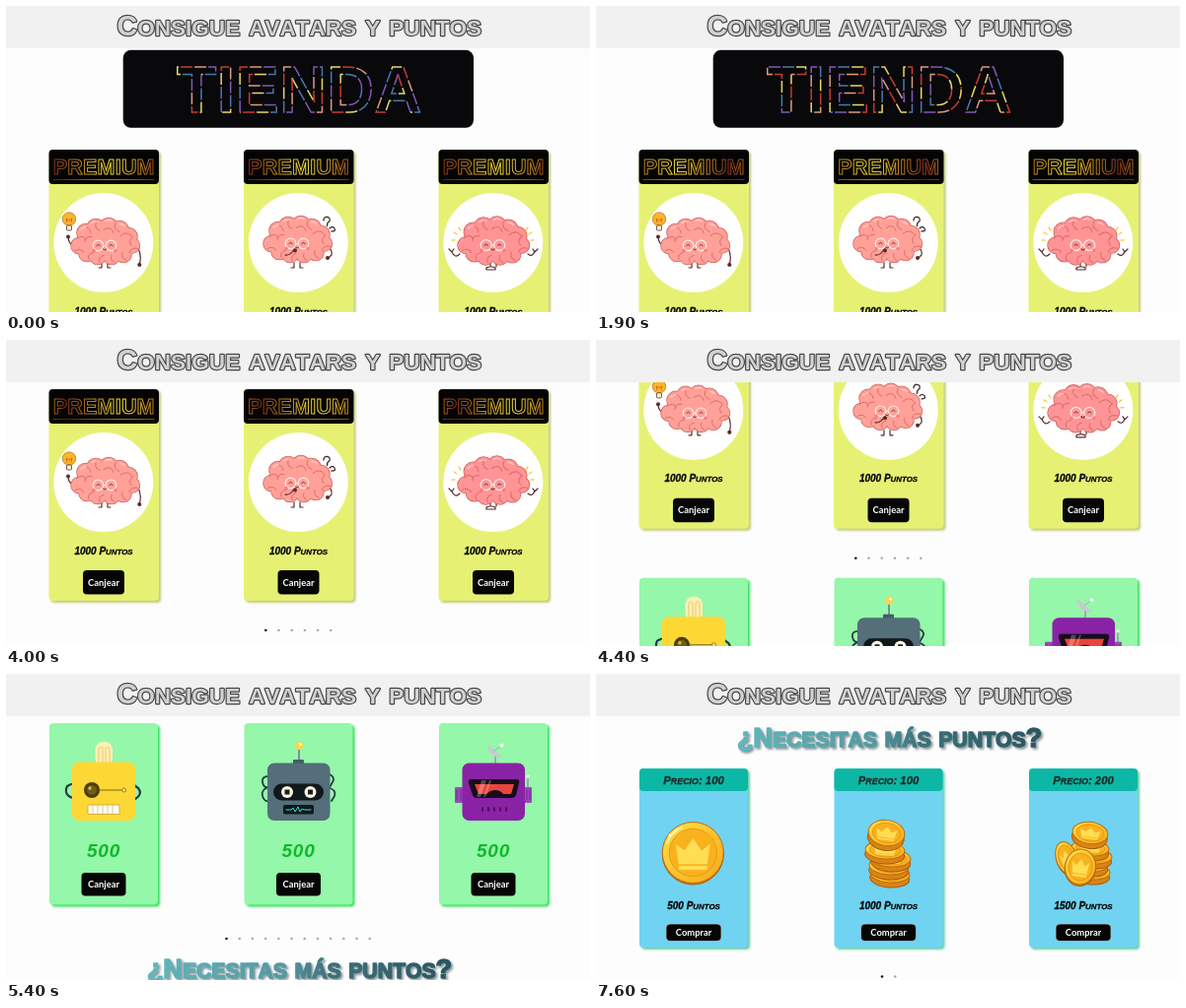
These frames come from a looping animation (592x311 px, 8600 ms). An HTML page:

```html
<!DOCTYPE html>
<html lang="es">
<head>
<meta charset="utf-8">
<title>Tienda</title>
<style>
html, body { margin: 0; width: 100%; height: 100%; overflow: hidden; background: #fefdfe; }
svg { display: block; width: 592px; height: 311px; }
text { font-family: "Liberation Sans", Arial, sans-serif; font-weight: 700; font-kerning: none; }
.mid { text-anchor: middle; }
.hand { font-style: italic; stroke-width: .3px; }
.btn { font-family: Lato, "Open Sans", sans-serif; font-size: 9.4px; fill: #fff; }
.title { fill: #d2d2d2; stroke: #484848; stroke-width: 2.4px; stroke-linejoin: round; paint-order: stroke; word-spacing: 1px; }
.more { fill: url(#teal); stroke: url(#teal); stroke-width: 1.5px; stroke-linejoin: round; filter: drop-shadow(2px 2px 1px #8a9a9e); }
.yellow { filter: drop-shadow(2px 2px 1px #c3c97c); }
.green { filter: drop-shadow(2px 2px 1px #2fe05a); }
.blue { filter: drop-shadow(2px 2px 1px #62cfa8); }
.line { fill: none; stroke-linecap: round; stroke-linejoin: round; }
</style>
</head>
<body>
<svg viewBox="0 0 592 311" xmlns="http://www.w3.org/2000/svg">
  <defs>
    <linearGradient id="teal" gradientUnits="userSpaceOnUse" x1="144" x2="451" y1="0" y2="0">
      <stop offset="0" stop-color="#62b7bc"/><stop offset=".45" stop-color="#5598a0"/>
      <stop offset=".6" stop-color="#3d727b"/><stop offset="1" stop-color="#2b5560"/>
    </linearGradient>
    <linearGradient id="fire" gradientUnits="userSpaceOnUse" x1="48" x2="158" y1="0" y2="0" spreadMethod="repeat">
      <stop offset="0" stop-color="#86301a"/><stop offset=".25" stop-color="#b5831f"/>
      <stop offset=".52" stop-color="#f2e038"/><stop offset=".78" stop-color="#c08a20"/>
      <stop offset="1" stop-color="#86301a"/>
    </linearGradient>
    <linearGradient id="gold" x2="1" y2="1">
      <stop offset="0" stop-color="#ffe04a"/><stop offset="1" stop-color="#f9a818"/>
    </linearGradient>
  </defs>
  <g id="page"></g>
  <rect width="592" height="43" fill="#f1f1f1"/>
  <g id="head"></g>
</svg>
<script>
const LOOP = 8600, STEP = 100, GAP = 197.5;
const $ = id => document.getElementById(id);

// [time, scroll offset]
const scroll = [
  [0, 0], [2100, 0], [2200, 4], [2300, 12], [2800, 69], [2900, 86], [3000, 96],
  [4000, 96], [4100, 104], [4300, 144], [4800, 270], [5000, 314], [5200, 347], [5400, 361],
  [6400, 361], [6500, 384], [6700, 466], [6800, 503], [7000, 549], [7300, 586], [7600, 596], [LOOP, 596]
];

const rect = (x, y, w, h, fill, r = 0, more = '') =>
  `<rect x="${x}" y="${y}" width="${w}" height="${h}" rx="${r}" fill="${fill}" ${more}/>`;
const dot = (x, y, r, fill, more = '') => `<circle cx="${x}" cy="${y}" r="${r}" fill="${fill}" ${more}/>`;
const line = (d, color, w = 1) => `<path class="line" d="${d}" stroke="${color}" stroke-width="${w}"/>`;
const shape = (d, fill, more = '') => `<path d="${d}" fill="${fill}" ${more}/>`;
const group = (y, s) => `<g transform="translate(0 ${y})">${s}</g>`;
const text = (x, y, size, s, cls = '', more = '') =>
  `<text x="${x}" y="${y}" font-size="${size}" class="${cls}" ${more}>${s}</text>`;
const caps = (s, size) => s.replace(/[a-zá]+/g,
  m => `<tspan font-size="${(size * .786).toFixed(2)}">${m.toUpperCase()}</tspan>`);
const hand = (x, y, size, s, fill = '#0a0a0a') =>
  text(x, y, size, caps(s, size), 'mid hand', `fill="${fill}" stroke="${fill}"`);
const row = draw => [0, 1, 2].map(i => `<g transform="translate(${i * GAP} 0)">${draw(i)}</g>`).join('');
const pager = (x, y, n) => Array.from({ length: n },
  (_, i) => dot(x + i * 13.2, y, 1.3, i ? '#aaa' : '#111')).join('');
const button = (x, y, w, h, s) =>
  rect(x, y, w, h, '#060606', 4) + text(x + w / 2, y + h / 2 + 3.3, 9.4, s, 'btn mid');

function banner() {
  const colors = ['#8159b4', '#4878ad', '#e8d768', '#c53c30', '#dd9a80'];
  return rect(118.7, 44.8, 355.3, 79, '#09080b', 8) + colors.map((c, i) =>
    text(173, 107.5, 66, 'TIENDA', 'dash', `fill="none" stroke="${c}" stroke-width="1.5"
      letter-spacing=".5" stroke-dasharray="12 58" data-shift="${i * 14}"`)).join('');
}

function premium() {
  return rect(43.5, 146, 111.5, 215, '#e6f174', 4, 'class="yellow"') +
    rect(43.5, 146, 111.5, 35, '#050404', 4) +
    text(47.8, 170.5, 21.5, 'PREMIUM', '', 'fill="#080502" stroke="url(#fire)" letter-spacing=".2"') +
    line('M48 176.5H150', 'url(#fire)', .6) +
    dot(98.8, 240.6, 50.5, '#fff') +
    hand(99, 313.5, 10, '1000 Puntos') +
    button(78, 330, 42, 24.5, 'Canjear');
}

function robotCard() {
  return rect(44, 411, 110, 184.5, '#95f7a9', 4, 'class="green"') +
    text(99, 546.5, 19, '500', 'mid hand', 'fill="#10b82a" letter-spacing=".8"') +
    button(76.5, 563, 45, 23.5, 'Canjear');
}

function coinCard(i) {
  const price = [100, 100, 200][i], points = [500, 1000, 1500][i];
  return rect(44, 692, 110, 182, '#70d3f2', 4, 'class="blue"') +
    rect(44, 692, 110, 23, '#0cb8a5', 4) +
    hand(99, 708, 11.3, `Precio: ${price}`, '#1d2b2b') +
    hand(99, 834.5, 10, `${points} Puntos`) +
    rect(71, 850, 56, 17.5, '#9a9a9a', 4) +
    button(71.5, 850.5, 55, 16.5, 'Comprar');
}

function brain(x, y, skin = '#ffa198', size = 1) {
  const lumps = [[-20, -9, 9], [-10, -14, 9], [3, -15, 9], [14, -12, 9], [23, -5, 9],
    [27, 4, 7.5], [18, 13, 8], [6, 15, 8], [-8, 15, 8], [-19, 12, 8], [-27, 4, 8]];
  const puff = more => lumps.map(([a, b, r]) => dot(a, b, r, skin, more)).join('');
  const folds = 'M-29-3q6-5 9 1M-23-15q7-1 8 6M-9-21q-4 7 3 10M-2-12q8-5 10 3M10-19q-3 6 4 9' +
    'M15-6q7-6 12 1M28-5q-6 4-2 9M33 7q-7-2-9 4M21 19q-6-3-4-8M9 21q-5-2-3-7M-6 21q-2-6 4-7' +
    'M-17 18q-2-6 5-7M-31 9q6-3 9 2M-14-5q-7-1-7 5';
  const eye = a => dot(a, 4, 5.3, 'none', 'stroke="#ffeae6" stroke-width="1.2"') +
    line(`M${a - 1.7} 4q1.7-2.5 3.4 0`, '#5b2528', .9);
  return `<g transform="translate(${x} ${y}) scale(${size})">` +
    puff('stroke="#cf5f5a" stroke-width="1.5"') + puff('') +
    `<ellipse rx="27" ry="15" fill="${skin}"/>` + line(folds, '#df6c67', 1) +
    line('M-25-12q2-3 5-3M-14-19q3-2 6-1M0-21q3-2 6 0M14-18q3 0 5 2', '#ffc9c2', 1.3) +
    eye(-7.5) + eye(5.5) + line('M-2 4h2', '#ffeae6', 1.2) +
    dot(-12, 9, 1.7, '#fb7a7d') + dot(10, 9, 1.7, '#fb7a7d') +
    line('M-2.6 7.5q1.7 2.5 3.4 0', '#7b2528', 1) + '</g>';
}

function brains() {
  const ink = '#5a2b2c';
  const bulb = dot(64, 216.5, 6.7, '#fbb62c', 'stroke="#b97a1a" stroke-width=".8"') +
    line('M62 220l-1-4 3 2 3-2-1 4', '#c9641a', .9) +
    rect(61.5, 223, 5, 5, '#fff1d0', 1, `stroke="${ink}" stroke-width=".8"`);
  const wise = line('M69 243q-6-1-6-9M134 246q4 9 1 17M97 261v5h-3M103 261v5h3', ink, 1.2) +
    dot(63, 234.5, 2, ink) + dot(135.3, 263, 2.1, ink) + bulb + brain(101, 239.5);
  const ask = line('M322 218q0-4 3.5-3.5t2.5 4q-3 2-2.5 5M325.5 227v.3M328 226q3-3 5 0t-3 3', '#3f2f30', 1.3) +
    line('M326 244q5 4 4 9l-4 4M292 261v5h-3M298 261v5h3', ink, 1.2) + dot(326, 256, 2, ink) +
    brain(296, 237.5) + line('M283 253q4 1 8-4l2-2', ink, 1.2) + dot(293, 248.5, 2, ink);
  const calm = line('M460 252q-5 5-8-2M529 252q5 4 7-3M449 247l3 3 2-3M534 247l2 3 3-3' +
      'M491 261v4q-5 0-4 3h9q1-3-4-3M497 261v4', ink, 1.2) +
    line('M457 232l-3-2M455 238h-3M461 228l-2-3M530 232l3-2M532 238h3M527 228l2-3', '#f6d04b', 1.4) +
    brain(494.5, 239, '#ff9496', 1.04);
  return wise + ask + calm;
}

function robots() {
  const ink = '#263b43';
  const teeth = [88, 93, 98, 103, 108].map(x => `M${x} 224v9`).join('');
  const first = line('M68 217q-10-3-6-12l4-2M131 218q8-5 3-11l-4-3', ink, 2.2) +
    rect(90.5, 160, 17.5, 25, '#fff0b4', 8) + line('M94 181v-14q2-4 4 0v14M101 181v-14q2-4 4 0v14', '#e8c66a', 1) +
    rect(67, 180.5, 64, 59.5, '#fdd835', 7) +
    dot(87, 209, 8, '#4b3d0b') + dot(87, 209, 5, '#6f5d16') + dot(85, 207, 1.7, '#d5bd55') +
    line('M95 209h22', '#7d6712', 1) + dot(119.5, 209, 2, '#fbe27a', 'stroke="#7d6712" stroke-width=".8"') +
    rect(83, 224, 32, 9.5, '#fffdf0', 1, 'stroke="#c8a02a" stroke-width=".8"') + line(teeth, '#c9bb8a', .8);
  const eye = x => dot(x, 211, 6, '#fff7dc') + rect(x - 2.5, 208.5, 5, 5, '#1a2024', .5);
  const second = line('M266 195q-7 0-6 6t6 5q-8 3-6 9t6 5M328 193q6 3 3 8t-3 6q7 2 5 8l-3 5', ink, 1.8) +
    line('M297 167v12', '#78909c', 2) + dot(297, 164, 4, '#fdd54a') + dot(298.5, 162.5, 1.4, '#fff6cf') +
    rect(291, 178, 11, 5, '#465c66', 1) + rect(265, 181.5, 63.5, 58.5, '#546e7a', 7) +
    rect(271, 202.5, 51, 17, '#11181c', 8.5) + eye(285) + eye(308.5) +
    rect(281, 224, 31, 9.5, '#12191c', 2) +
    line('M284 229h5l2-2 2 4 3-5 2 5 2-3 2 1h7', '#35e0c5', 1);
  const third = line('M496 182v-8M529 206v-10', '#9b9bab', 1.6) +
    shape('M488 162q0 14 15 14z', '#c7c9d4') + line('M495 169l7-5', '#a9acba', 1) + dot(502.5, 163.5, 2, '#f6fff8') +
    dot(529, 195, 1.8, '#e7f7ea') +
    rect(455, 206, 9, 16, '#9c49b8', 1) + rect(525, 206, 8, 16, '#9c49b8', 1) +
    line('M457 209v10M461 209v10M528 209v10M531 209v10', '#6f1d88', .8) +
    rect(462.5, 181.5, 63.5, 58.5, '#8a22a6', 7) +
    shape('M471 198h47q3 0 2 4l-3 12q-1 3-4 3h-36q-3 0-4-3l-4-12q-1-4 2-4z', '#160d1b') +
    shape('M475 203h40l-3 10h-8q-3-4-8-4t-9 4h-8z', '#e8463c') +
    shape('M482 199h5l-6 17h-4zM490 199h2l-6 17h-2z', '#fff', 'opacity=".25"') +
    line('M483 227v3M489 227v3M495 227v3M501 227v3M507 227v3', '#3d0b4c', 1.6);
  return first + second + third;
}

function coin(x, y, rx, ry, turn = 0, thick = 4) {
  const oval = (dy, a, b, fill, more = '') =>
    `<ellipse cy="${dy}" rx="${a}" ry="${b}" fill="${fill}" ${more}/>`;
  const k = `scale(${rx / 32} ${ry / 32})`;
  return `<g transform="translate(${x} ${y}) rotate(${turn})">` +
    oval(thick, rx, ry, '#d98312', 'stroke="#a95c12"') +
    oval(0, rx, ry, 'url(#gold)', 'stroke="#b96c12"') +
    oval(0, rx * .78, ry * .78, '#f9b21e', 'stroke="#e0930f" stroke-width=".8"') +
    `<g transform="${k}">${shape('M-15 12L-18-9l9 7L0-15l9 13 9-7-3 21zM-15 14h30v4h-30z', '#ffdd55')}</g></g>`;
}

function coins() {
  const one = coin(98.3, 181.5, 31, 31, 0, 1.5) + line('M72 172q4-12 15-16', '#fff3a8', 2) + dot(75, 164, 1.4, '#fff');
  const stack = [[298, 203, 20], [297, 195, 20], [299, 187, 20], [293, 179, 20]]
    .map(([x, y, r]) => coin(x, y, r, 9, 4, 5)).join('') + coin(294.5, 161.5, 18.5, 13, 8, 5);
  const pile = [[502, 201, 19], [500, 193, 19], [504, 185, 19], [501, 177, 19]]
    .map(([x, y, r]) => coin(x, y, r, 8, 4, 5)).join('') + coin(501, 161.5, 18, 11, 8, 5) +
    coin(477, 187, 10.5, 17, -18, 1.5) + coin(491, 196, 15.5, 18, 8, 1.5);
  return one + stack + pile;
}

$('page').innerHTML = banner() + row(premium) + brains() + pager(263.3, 391, 6) +
  row(robotCard) + group(270, robots()) + pager(223.5, 630, 12) +
  text(297.5, 670, 27, caps('¿Necesitas más puntos?', 27), 'mid more') +
  row(coinCard) + group(596, coins()) + pager(290, 903.5, 2);
$('head').innerHTML = text(297.3, 30, 28.7, caps('Consigue avatars y puntos', 28.7), 'mid title');

const dashes = [...document.querySelectorAll('.dash')];

function valueAt(t, keys) {
  const i = keys.findIndex(k => k[0] > t);
  const [t0, a] = keys[i - 1], [t1, b] = keys[i];
  return a + (b - a) * (t - t0) / (t1 - t0);
}

function draw(now) {
  const t = Math.floor(now % LOOP / STEP) * STEP;
  const play = Math.max(0, t - 300);
  $('page').setAttribute('transform', `translate(0 ${-valueAt(t, scroll).toFixed(1)})`);
  $('fire').setAttribute('gradientTransform', `translate(${play % 900 / 900 * 110} 0)`);
  for (const d of dashes) d.setAttribute('stroke-dashoffset', -d.dataset.shift - play * .025);
}

let start = null;
function tick(now) {
  start ??= now;
  draw(now - start);
  requestAnimationFrame(tick);
}
draw(0);
requestAnimationFrame(tick);
</script>
</body>
</html>
```
